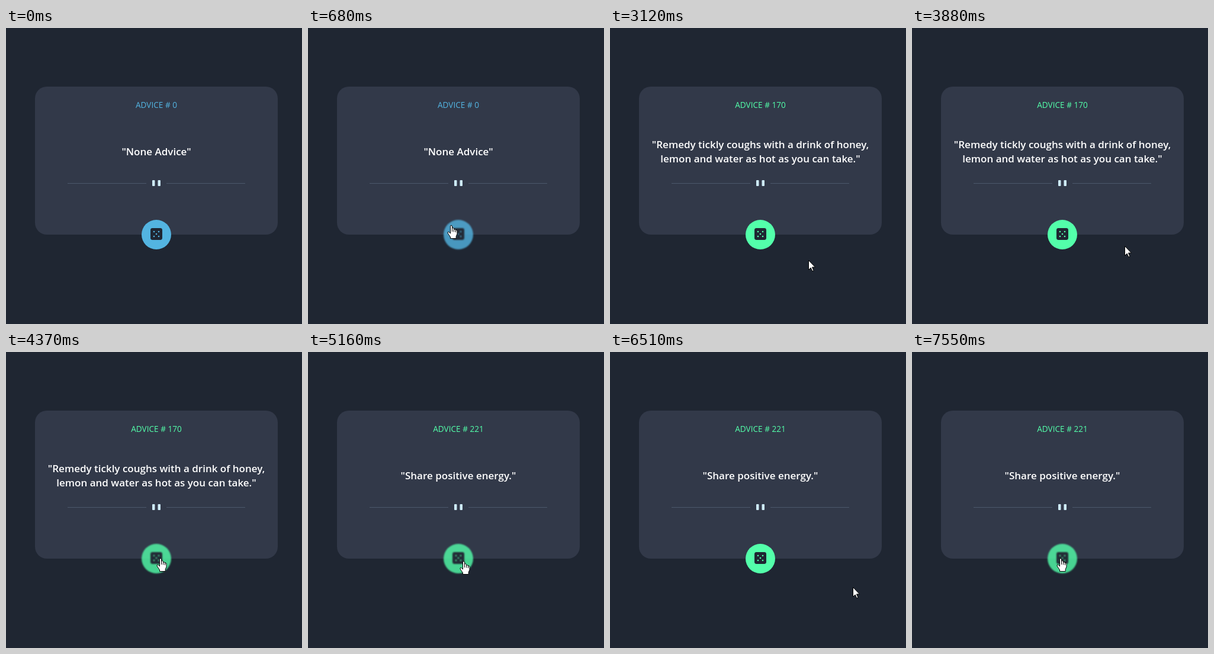
These frames come from a looping animation (500x500 px, 8 s). An HTML page with a canvas:

```html
<!DOCTYPE html>
<html lang="en">
<head>
<meta charset="utf-8">
<title>Advice card</title>
<style>
html, body { margin: 0; width: 100%; height: 100%; overflow: hidden; background: #1f2632; }
canvas { display: block; width: 500px; height: 500px; }
</style>
</head>
<body>
<canvas id="stage" width="500" height="500"></canvas>
<script>
const ctx = document.getElementById('stage').getContext('2d');
const LOOP = 8000, STEP = 70;
const BG = '#1f2632', CARD = '#323949', BLUE = '#53b4e1', GREEN = '#53ffaa';
const FONT = '"Open Sans", "Noto Sans", sans-serif';
const CENTER = 254;
const BUTTON = { x: CENTER, y: 349, r: 25 };

// Places the pointer travels between.
const spot = {
  entry: { x: 434, y: 488 },
  buttonLeft: { x: 242, y: 334 },
  buttonTop: { x: 259, y: 344 },
  buttonLow: { x: 263, y: 354 },
  buttonMid: { x: 251, y: 349 },
  below: { x: 300, y: 385 },
  farRight: { x: 447, y: 416 },
  right: { x: 388, y: 408 },
  aside: { x: 374, y: 378 },
  corner: { x: 410, y: 397 }
};

const trips = [
  { start: 190, end: 680, to: spot.buttonLeft },
  { start: 2030, end: 2100, to: spot.buttonLow },
  { start: 2850, end: 3120, to: spot.below },
  { start: 3120, end: 3340, to: spot.farRight },
  { start: 3340, end: 3610, to: spot.right },
  { start: 3680, end: 4370, to: spot.buttonTop, lift: 40 },
  { start: 4370, end: 4510, to: spot.buttonLow },
  { start: 5360, end: 5640, to: spot.aside },
  { start: 5970, end: 6510, to: spot.corner },
  { start: 6850, end: 7550, to: spot.buttonMid }
];
trips.forEach((trip, i) => { trip.from = i ? trips[i - 1].to : spot.entry; });

const quotes = [
  { from: 0, id: 0, color: BLUE, lines: ['"None Advice"'] },
  { from: 2310, id: 170, color: GREEN,
    lines: ['"Remedy tickly coughs with a drink of honey,', 'lemon and water as hot as you can take."'] },
  { from: 4980, id: 221, color: GREEN, lines: ['"Share positive energy."'] }
];

const latest = (list, key, t) => list.filter(item => item[key] <= t).pop();
const mix = (a, b, u) => a + (b - a) * u;
const easeInOut = u => u * u * (3 - 2 * u);

function pointerAt(t) {
  const trip = latest(trips, 'start', t);
  if (!trip) return null;
  const { start, end, from, to, lift = 0 } = trip;
  const stepped = Math.ceil((t - start) / STEP) * STEP;
  const u = easeInOut(Math.min(1, stepped / (end - start)));
  return {
    x: Math.round(mix(from.x, to.x, u)),
    y: Math.round(mix(from.y, to.y, u) - lift * Math.sin(Math.PI * u))
  };
}

function box(x, y, w, h, r, color) {
  ctx.fillStyle = color;
  ctx.beginPath();
  ctx.roundRect(x, y, w, h, r);
  ctx.fill();
}

function disc(x, y, r, color) {
  ctx.fillStyle = color;
  ctx.beginPath();
  ctx.arc(x, y, r, 0, Math.PI * 2);
  ctx.fill();
}

function label(text, y, font, color) {
  ctx.font = `${font} ${FONT}`;
  ctx.fillStyle = color;
  ctx.textAlign = 'center';
  ctx.fillText(text, CENTER, y);
}

function drawCard({ id, color, lines }) {
  box(49, 99, 410, 250, 20, CARD);
  label(`ADVICE # ${id}`, 135, '400 13.6px', color);
  const top = 215 - (lines.length - 1) * 12;
  lines.forEach((line, i) => label(line, top + i * 24, '600 17px', '#fff'));
  for (const side of [-1, 1]) {
    box(CENTER + side * 83.5 - 66.5, 262, 133, 1, 0, '#4b586b');
    box(CENTER + side * 4.75 - 2.25, 257, 4.5, 10, 1, '#cdeaf8');
  }
}

function drawButton(color, hover) {
  const { x, y, r } = BUTTON;
  const alpha = hover ? 0.8 : 1;
  ctx.save();
  if (hover) ctx.filter = 'blur(1px)';
  ctx.globalAlpha = alpha;
  disc(x, y, r, color);
  ctx.globalAlpha = 1;
  box(x - 10, y - 11, 20, 20, 3.4, hover ? '#232b36' : BG);
  ctx.globalAlpha = alpha;
  disc(x, y - 1, 1.3, color);
  for (const dx of [-4, 4]) {
    for (const dy of [-4, 4]) disc(x + dx, y - 1 + dy, 1.3, color);
  }
  ctx.restore();
}

function drawPointer({ x, y }, hover) {
  const arrow = 'M.5.5V16.5L4.2 13L6.8 18.8L9 17.8L6.5 12H11.5Z';
  const hand = 'M-1.5 13V1.2Q-1.5-.5 0-.5T1.5 1.2V6Q2-.2 4.5 5.5V7Q5 4.8 7.5 6.5V8' +
    'Q8 6 10 8V14L8.2 18V21.5H-1.5V19L-5.6 13Q-6.8 10.2-4.4 10.2Z';
  const fingers = 'M1.5 5.5V10M4.5 6.5V10.5M7.5 7.5V11';
  const shape = new Path2D(hover ? hand : arrow);
  ctx.save();
  ctx.translate(x, y);
  ctx.lineJoin = 'round';
  ctx.fillStyle = '#fff';
  ctx.strokeStyle = '#000';
  ctx.fill(shape);
  ctx.stroke(shape);
  if (hover) ctx.stroke(new Path2D(fingers));
  ctx.restore();
}

function draw(t) {
  const pointer = pointerAt(t);
  const hover = !!pointer && Math.hypot(pointer.x - BUTTON.x, pointer.y - BUTTON.y) < BUTTON.r;
  ctx.fillStyle = BG;
  ctx.fillRect(0, 0, 500, 500);
  drawCard(latest(quotes, 'from', t));
  drawButton(t < 2030 ? BLUE : GREEN, hover);
  if (pointer) drawPointer(pointer, hover);
}

const began = performance.now();
function tick() {
  draw((performance.now() - began) % LOOP);
  requestAnimationFrame(tick);
}
tick();
</script>
</body>
</html>
```
